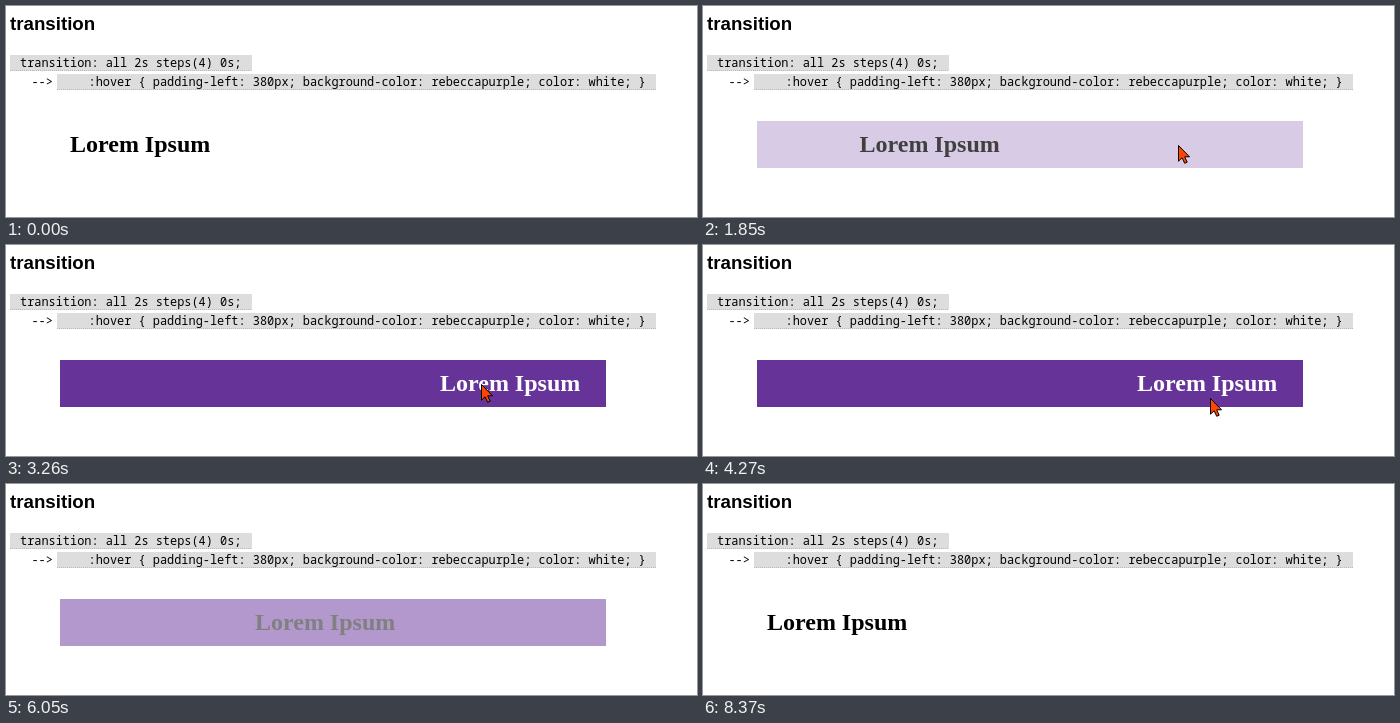
An HTML page that plays this animation: 691 px wide and 211 px high, repeating every 8.41 s.

```html
<!DOCTYPE html>
<html lang="en">
<head>
<meta charset="utf-8">
<title>transition</title>
<style>
  html, body { margin: 0; width: 100%; height: 100%; overflow: hidden; background: #fff; }
  svg { display: block; }
  text { white-space: pre; }
  .head { font: bold 18.72px "Liberation Sans", Arial, sans-serif; }
  .code { font: 11.91px "Noto Sans Mono", "DejaVu Sans Mono", monospace; }
  .lorem { font: bold 24px "Liberation Serif", "Times New Roman", serif; }
  .chip { fill: #ddd; }
  .rule { stroke: #bbb; stroke-dasharray: 1 1; }
</style>
</head>
<body>
<svg width="691" height="211" viewBox="0 0 691 211">
  <text class="head" x="4" y="24">transition</text>

  <rect class="chip" x="4" y="49" width="242" height="16"/>
  <path class="rule" d="M4 64.5H246"/>
  <text class="code" x="14" y="61">transition: all 2s steps(4) 0s;</text>

  <text class="code" x="25.4" y="80">--&gt;</text>
  <rect class="chip" x="51" y="68" width="599" height="16"/>
  <path class="rule" d="M51 83.5H650"/>
  <text class="code" x="82.5" y="80">:hover { padding-left: 380px; background-color: rebeccapurple; color: white; }</text>

  <rect id="bar" x="54" y="115" width="546" height="47" fill="#639" fill-opacity="0"/>
  <text id="lorem" class="lorem" x="64" y="146">Lorem Ipsum</text>

  <path id="cursor" d="M.5 .5V16.2L4.1 12.8L6.7 18.3L9.2 17.2L6.7 11.8H11.5Z"
        fill="#ff4500" stroke="#000" visibility="hidden"/>
</svg>
<script>
  const LOOP = 8410, TICK = LOOP / 109;
  const ENTER = 880, LEAVE = 4560, STEP = 500, STEPS = 4;

  // time, x, y of the pointer tip
  const path = [
    [380, 500, 211], [840, 484, 166], [1160, 479, 149], [1560, 475, 139],
    [3560, 475, 139], [4360, 512, 155], [4560, 528, 163],
    [5200, 594, 192], [5480, 612, 211]
  ];

  const bar = document.getElementById("bar");
  const lorem = document.getElementById("lorem");
  const cursor = document.getElementById("cursor");

  const stepsSince = (t, from) =>
    Math.max(0, Math.min(STEPS, Math.floor((t - from) / STEP)));

  function pointerAt(t) {
    const i = path.findIndex(p => p[0] > t);
    if (i < 1) return null;
    const [t0, x0, y0] = path[i - 1], [t1, x1, y1] = path[i];
    const k = (t - t0) / (t1 - t0);
    return [Math.round(x0 + (x1 - x0) * k), Math.round(y0 + (y1 - y0) * k)];
  }

  function draw(time) {
    const t = Math.floor(time % LOOP / TICK) * TICK;
    const k = (stepsSince(t, ENTER) - stepsSince(t, LEAVE)) / STEPS;
    const shade = Math.round(255 * k);
    bar.setAttribute("fill-opacity", k);
    lorem.setAttribute("x", 64 + 370 * k);
    lorem.setAttribute("fill", `rgb(${shade},${shade},${shade})`);

    const tip = pointerAt(t);
    cursor.setAttribute("visibility", tip ? "visible" : "hidden");
    if (tip) cursor.setAttribute("transform", `translate(${tip})`);
  }

  const start = performance.now();
  function tick() {
    draw(performance.now() - start);
    requestAnimationFrame(tick);
  }
  tick();
</script>
</body>
</html>
```
